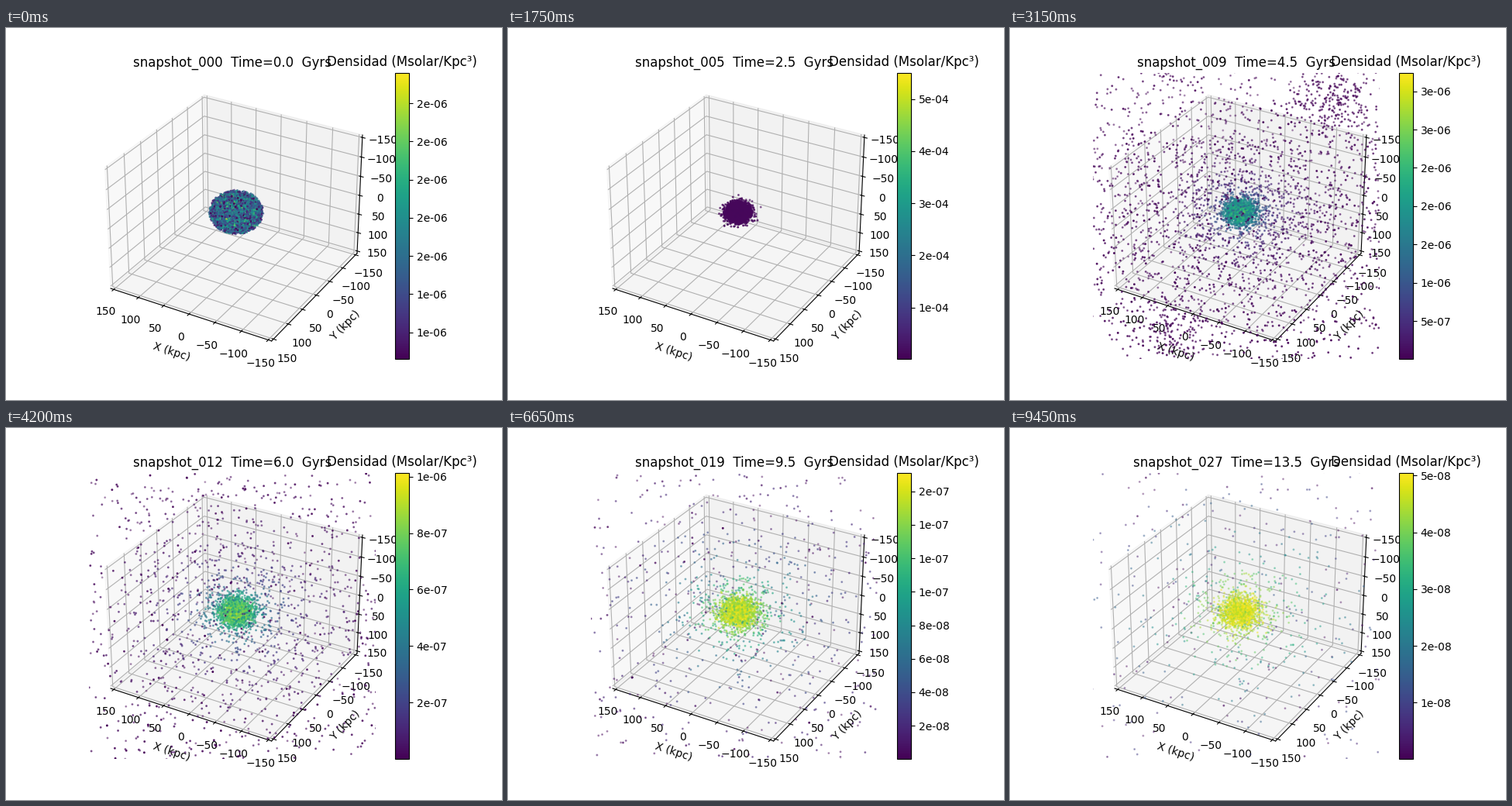
A matplotlib script that plays this animation: 640x480 px, repeating every 9.8 s.

```python
import numpy as np
import matplotlib.pyplot as plt
from matplotlib.animation import FuncAnimation
from matplotlib.cm import ScalarMappable
from matplotlib.colors import Normalize

FRAMES, INTERVAL = 28, 350
BOUNCE = 5                      # step at which the sphere has collapsed
RADIUS = 46                     # kpc
N_CORE, N_HALO, N_EJECTA = 1150, 560, 2900
JETS = [((-23, -41, -54), 190), ((11, 35, 58), 130)]
N = N_CORE + N_HALO + N_EJECTA + sum(n for _, n in JETS)

rng = np.random.default_rng(12)


def directions(n):
    d = rng.normal(size=(n, 3))
    return d / np.linalg.norm(d, axis=1, keepdims=True)


# Initial uniform sphere, and the small cloud it collapses into
r0 = rng.random((N, 1)) ** (1 / 3)
start = RADIUS * r0 * directions(N)
cloud = rng.normal(0, 9, (N, 3))
orbit = rng.normal(0, 9, (N_CORE, 3))
omega = rng.uniform(0.4, 1.6, (N_CORE, 1))
halo = directions(N_HALO) * (18 + rng.exponential(48, (N_HALO, 1)))
speed = 100 * rng.random((N_EJECTA, 1)) ** (1 / 1.6)
velocity = np.vstack([directions(N_EJECTA) * speed]
                     + [rng.normal(v, 8, (n, 3)) for v, n in JETS])
shade0 = np.clip(0.54 - 0.3 * r0[:, 0] ** 3 + rng.normal(0, 0.17, N), 0, 1)
grain = rng.normal(1, 0.07, N)


def shrink(k):
    return max(0, 1 - (k / BOUNCE) ** 2) ** (2 / 3)


def positions(k):
    if k <= BOUNCE:
        return start * shrink(k) + cloud * (k / BOUNCE) ** 6
    t = k - BOUNCE
    core = cloud[:N_CORE] * np.cos(omega * t) + orbit * np.sin(omega * t)
    core *= np.interp(k, [5, 9, 15], [1, 1.4, 1.7])
    shell = halo * np.interp(k, [5, 9, 15, 27], [0.2, 0.38, 1, 1.25])
    return np.vstack([core, shell, cloud[N_CORE + N_HALO:] + velocity * t])


def limits(k):
    """Colour range; the peak density falls as the cube of a linear growth."""
    if k <= BOUNCE:
        return 1.06e-6, (12.2 + 60.9 * shrink(k)) ** -3
    size = np.interp(k, [5, 9, 15, 19, 23, 27],
                     [12.2, 64.4, 134.7, 180.1, 225.4, 270.5])
    return 5e-4 * size ** -3, size ** -3


def shades(k, pos):
    if k <= BOUNCE:
        f = (k / BOUNCE) ** 2
        return shade0 * (1 - f) + 0.02 * f * grain
    r = np.linalg.norm(pos, axis=1)
    peak = np.interp(k, [5, 9, 15, 27], [0.05, 0.82, 0.95, 0.97])
    reach = 7.2 * (k - BOUNCE) + 3
    return np.clip(peak * grain / (1 + (r / reach) ** 2), 0, 1)


fig = plt.figure(figsize=(6.4, 4.8), dpi=100)
ax = fig.add_subplot(projection="3d")
norm = Normalize(*limits(0))
mappable = ScalarMappable(norm, "viridis")
bar = fig.colorbar(mappable, ax=ax, format="%.0e")
bar.ax.set_title("Densidad (Msolar/Kpc³)")
title = ax.set_title("", y=1)
title.set_y(1)                  # 3D axes lower their title otherwise
ax.set_xlabel("X (kpc)")
ax.set_ylabel("Y (kpc)")
edge = 150 * 25 / 24
for name in "xyz":
    ax.set(**{f"{name}ticks": range(-150, 151, 50)})
points = None


def update(k):
    global points
    if points is not None:
        points.remove()
    low, high = limits(k)
    with norm.callbacks.blocked():
        norm.vmin, norm.vmax = low, high
    mappable.changed()
    pos = positions(k)
    points = ax.scatter(*pos.T, c=low + (high - low) * shades(k, pos),
                        cmap="viridis", norm=norm, s=1, linewidths=1.1)
    ax.set(xlim=(edge, -edge), ylim=(edge, -edge), zlim=(edge, -edge))
    title.set_text(f"snapshot_{k:03d}  Time={k / 2:.1f}  Gyrs")


anim = FuncAnimation(fig, update, frames=FRAMES, interval=INTERVAL,
                     init_func=lambda: None, repeat=True, repeat_delay=0)
plt.show()
```
